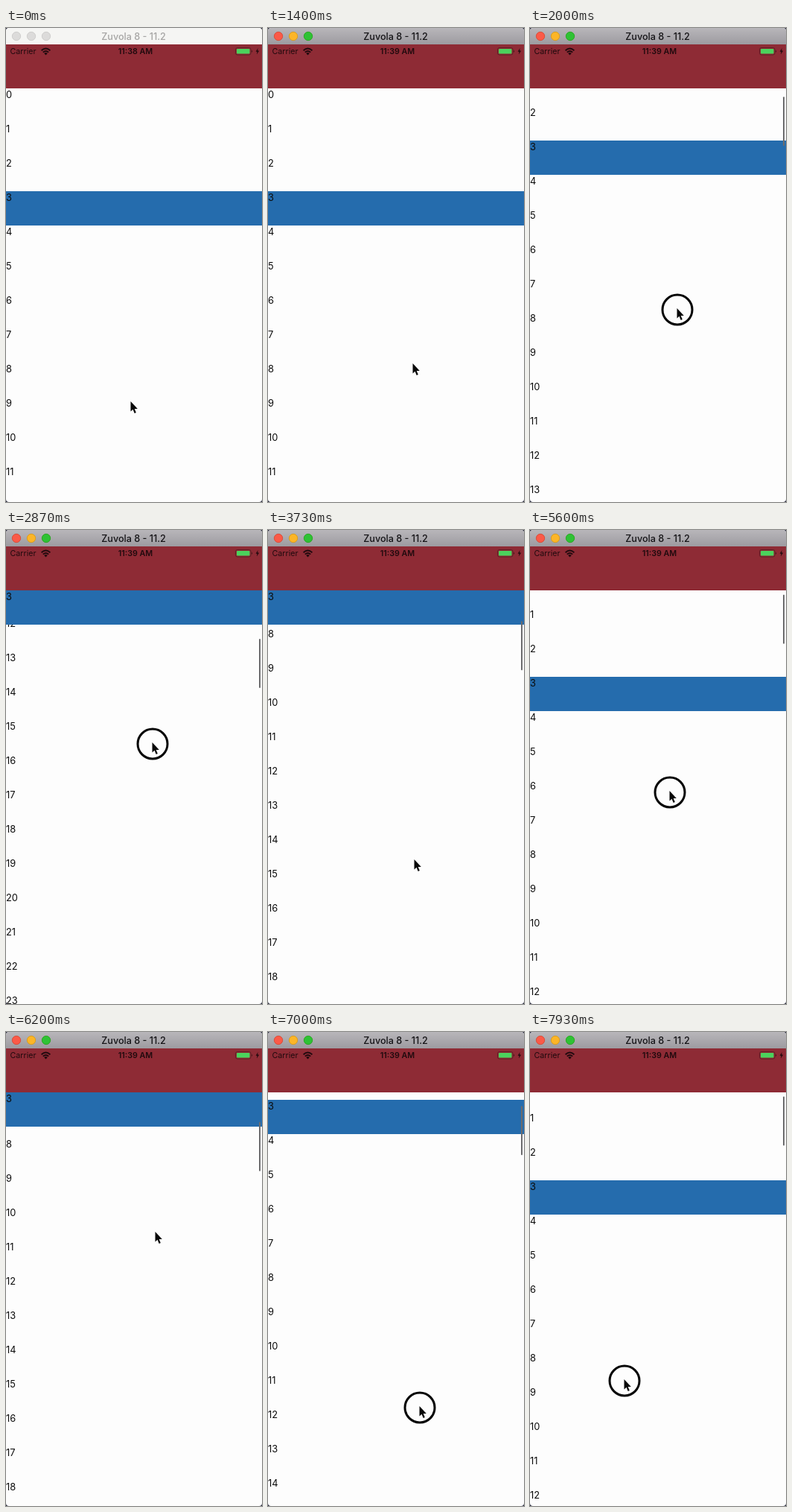
An HTML page that plays this animation: 344 px wide and 636 px high, repeating every 8000 ms.

```html
<!DOCTYPE html>
<html lang="en">
<head>
<meta charset="utf-8">
<title>Sticky row</title>
<style>
  html, body { margin: 0; width: 100%; height: 100%; overflow: hidden; background: #25263a; }
  svg { display: block; width: 344px; height: 636px; font-family: Inter, "Open Sans", sans-serif; }
  .bar { fill: #f5f5f3; }
  .light { fill: #dcdbda; stroke: #c9c8c7; stroke-width: .8; }
  .title { font-size: 12.6px; font-weight: 500; fill: #a6a5a4; }
  .active .title { fill: #141316; }
  .active .bar { fill: url(#chrome); }
  .active .close { fill: #fb5a48; stroke: #d9432b; }
  .active .mini { fill: #fcb527; stroke: #d99a10; }
  .active .zoom { fill: #2fc235; stroke: #1da512; }
  .status { font-size: 10.7px; fill: #200a0e; }
  .row { font-size: 12.8px; fill: #0b0b0b; }
</style>
</head>
<body>
<svg id="stage" viewBox="0 0 344 636">
  <defs>
    <linearGradient id="chrome" x2="0" y2="1">
      <stop offset="0" stop-color="#b8b6ba"/>
      <stop offset="1" stop-color="#9d9ba0"/>
    </linearGradient>
    <clipPath id="window"><rect width="344" height="636" rx="4"/></clipPath>
    <clipPath id="view"><rect y="81" width="344" height="555"/></clipPath>
  </defs>
  <g clip-path="url(#window)">
    <rect width="344" height="636" fill="#fdfdfd"/>
    <g clip-path="url(#view)">
      <g id="rows"></g>
      <g id="sticky">
        <rect width="344" height="46" fill="#256cad"/>
        <text class="row" y="12.9">3</text>
      </g>
      <rect id="scroller" x="340" width="2" height="66" rx="1" fill="#6c6c6e"/>
    </g>

    <rect class="bar" width="344" height="22"/>
    <circle class="light close" cx="14" cy="11" r="5.7"/>
    <circle class="light mini" cx="34" cy="11" r="5.7"/>
    <circle class="light zoom" cx="54" cy="11" r="5.7"/>
    <text class="title" x="171.5" y="15.7" text-anchor="middle">Zuvola 8 - 11.2</text>

    <rect y="22" width="344" height="59" fill="#8e2b35"/>
    <g class="status">
      <text x="5.5" y="35.2">Carrier</text>
      <text id="clock" x="174" y="35.2" text-anchor="middle" font-weight="600"></text>
      <path d="M47.6 30.2Q53.5 24.8 59.4 30.2M49.8 32.6Q53.5 29.2 57.2 32.6"
        fill="none" stroke="#200a0e" stroke-width="1.9"/>
      <path d="M51.2 34Q53.5 32.2 55.8 34L53.5 36.4Z"/>
      <rect x="308.5" y="26.5" width="20.5" height="9.5" rx="2.4" fill="none" stroke="#5c2226"/>
      <rect x="310" y="28" width="17.5" height="6.5" rx="1" fill="#4bd25c"/>
      <path d="M330.2 29.5q1.6 1.7 0 3.5z"/>
      <path d="M338.6 27l-3 4.8h2l-.7 3.6 3.3-5h-2.1z"/>
    </g>
  </g>
  <g id="pointer">
    <circle id="touch" r="20" fill="none" stroke="#050505" stroke-width="3"/>
    <path d="M-.5-2V11.5L2.5 8.7 4.7 13.9 6.8 13 4.7 7.9H8.8Z"
      fill="#080808" stroke="#fdfdfd" paint-order="stroke"/>
  </g>
</svg>
<script>
const LOOP = 8000, FPS = 15, ROW = 46, TOP = 81, PINNED = 3;
const ACTIVATE = 1.2;  // seconds until the window gets focus
const FRICTION = .7;   // time constant of the scroll momentum

const idle = { press: 0, release: 0, x: 168, from: 503, to: 503 };
const swipes = [
  { press: 1.74, release: 2.138, x: 198, from: 446, to: 287 },
  { press: 2.85, release: 3.625, x: 197, from: 287, to: 444 },
  { press: 4.8, release: 5, x: 184, from: 444, to: 510 },
  { press: 5.45, release: 5.776, x: 188, from: 374, to: 270 },
  { press: 6.38, release: 7.07, x: 204, from: 270, to: 560 },
  { press: 7.75, release: 8.134, x: 127, from: 488, to: 400 }
];

const $ = id => document.getElementById(id);
const mix = (a, b, k) => a + (b - a) * k;
const smooth = k => k * k * (3 - 2 * k);
const move = (node, x, y) => node.setAttribute("transform", `translate(${x} ${y})`);

$("rows").innerHTML = Array.from({ length: 40 }, (_, n) =>
  `<text class="row" y="${n * ROW + 12.9}">${n === PINNED ? "" : n}</text>`).join("");

// A swipe accelerates evenly; its final speed carries the list on.
function coast(scroll, swipe, elapsed) {
  const speed = 2 * (swipe.from - swipe.to) / (swipe.release - swipe.press || 1);
  return Math.max(0, scroll + speed * FRICTION * (1 - Math.exp(-elapsed / FRICTION)));
}

function pose(t) {
  let last = idle, scroll = 0;
  for (const swipe of swipes) {
    if (t < swipe.press) {
      const k = smooth((t - last.release) / (swipe.press - last.release));
      return {
        x: mix(last.x, swipe.x, k),
        y: mix(last.to, swipe.from, k),
        scroll: coast(scroll, last, t - last.release),
        pressed: false
      };
    }
    scroll = coast(scroll, last, swipe.press - last.release);
    if (t < swipe.release) {
      const k = (t - swipe.press) / (swipe.release - swipe.press);
      const y = mix(swipe.from, swipe.to, k * k);
      return { x: swipe.x, y, scroll: Math.max(0, scroll + swipe.from - y), pressed: true };
    }
    scroll = Math.max(0, scroll + swipe.from - swipe.to);
    last = swipe;
  }
}

function draw(time) {
  const t = Math.floor((time % LOOP + 5) * FPS / 1000) / FPS % (LOOP / 1000);
  const { x, y, scroll, pressed } = pose(t);
  const offset = Math.round(scroll);
  move($("rows"), 0, TOP - offset);
  move($("sticky"), 0, Math.max(TOP, TOP + PINNED * ROW - offset));
  $("scroller").setAttribute("y", 84 + offset * .12);
  $("scroller").style.opacity = +(offset > 0);
  move($("pointer"), Math.round(x), Math.round(y));
  $("touch").style.opacity = +pressed;
  $("stage").classList.toggle("active", t >= ACTIVATE);
  $("clock").textContent = t < ACTIVATE ? "11:38 AM" : "11:39 AM";
}

const start = performance.now();
function tick() {
  draw(performance.now() - start);
  requestAnimationFrame(tick);
}
tick();
</script>
</body>
</html>
```
